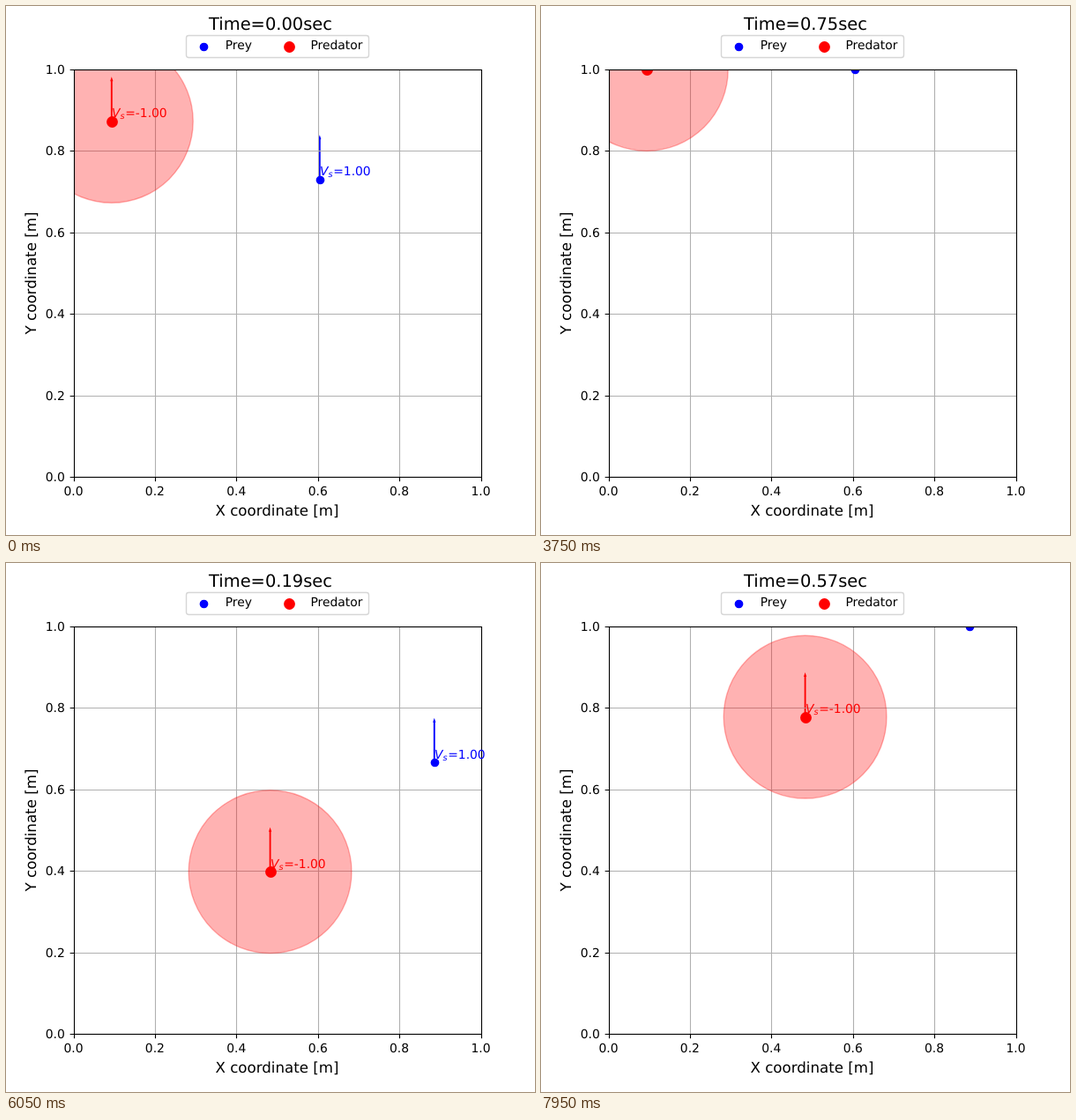
These frames come from a looping animation (600 px wide and 600 px high, 8 s). An HTML page:

```html
<!DOCTYPE html>
<html lang="en">
<head>
<meta charset="utf-8">
<title>Prey and predator</title>
<style>
  html, body { margin: 0; width: 100%; height: 100%; overflow: hidden; background: #fff; }
  svg { display: block; width: 100vw; height: 100vh; }
  text { font-family: "DejaVu Sans", sans-serif; font-size: 13.89px; text-rendering: geometricPrecision; }
  .mid { text-anchor: middle; }
  .end { text-anchor: end; }
  .label { font-size: 16.67px; }
  .title { font-size: 19.44px; }
  .line { fill: none; stroke-width: 1.11; }
</style>
</head>
<body>
<svg id="stage" viewBox="0 0 600 600"></svg>
<script>
const stage = document.getElementById("stage");
const LEFT = 76.5, TOP = 72, BOTTOM = 534, UNIT = 462;
const FRAME = 50, LOOP = 8000, RESTART = 102;

// Start positions in pixels for each episode.
const EPISODES = [
  { prey: [355.8, 196.65], predator: [119.8, 130.85] },
  { prey: [485.8, 314], predator: [299.6, 437.95] }
];

function add(parent, tag, attrs, text) {
  const node = document.createElementNS("http://www.w3.org/2000/svg", tag);
  for (const key in attrs) node.setAttribute(key, attrs[key]);
  if (text !== undefined) node.textContent = text;
  parent.appendChild(node);
  return node;
}

function set(node, attrs) {
  for (const key in attrs) node.setAttribute(key, attrs[key]);
}

const snap = v => Math.floor(v + 0.5) + 0.5;

const clip = add(add(stage, "defs", {}), "clipPath", { id: "plot" });
add(clip, "rect", { x: 77, y: TOP, width: UNIT, height: UNIT });

const layer = () => add(stage, "g", { "clip-path": "url(#plot)" });
const arrows = layer(), grid = layer(), marks = layer();
const frame = add(stage, "g", {}), labels = add(stage, "g", {});

const range = add(marks, "circle", {
  r: 0.2 * UNIT, fill: "#f00", "fill-opacity": 0.3,
  stroke: "#f00", "stroke-opacity": 0.3, "stroke-width": 1.39
});

function makeAgent(color, r, speed) {
  const text = add(labels, "text", { fill: color });
  add(text, "tspan", { "font-style": "italic" }, "V");
  add(text, "tspan", { "font-style": "italic", "font-size": 9.72, dy: 2 }, "s");
  add(text, "tspan", { dx: 0.6, dy: -2 }, "=" + speed);
  return {
    text,
    arrow: add(arrows, "path", { fill: color, stroke: color, "stroke-width": 1.39, "stroke-miterlimit": 10 }),
    dot: add(marks, "circle", { r, fill: color })
  };
}

const prey = makeAgent("#00f", 4.85, "1.00");
const predator = makeAgent("#f00", 6.42, "-1.00");

function drawAxes() {
  for (let i = 0; i <= 5; i++) {
    const x = LEFT + i * UNIT / 5, y = BOTTOM - i * UNIT / 5;
    const sx = snap(x), sy = snap(y), value = (i / 5).toFixed(1);
    if (i % 5) {
      add(grid, "path", {
        class: "line", stroke: "#b0b0b0",
        d: `M${sx} ${TOP}V${BOTTOM}M77 ${sy}H539`
      });
    }
    add(frame, "path", {
      class: "line", stroke: "#000",
      d: `M${sx} 534.5v4.86M77.5 ${sy}h-4.86`
    });
    add(frame, "text", { class: "mid", x, y: 555 }, value);
    add(frame, "text", { class: "end", x: 66.8, y: Math.round(y) + 5 }, value);
  }
  add(frame, "rect", { class: "line", stroke: "#000", x: 77.5, y: 72.5, width: UNIT, height: UNIT });
  add(frame, "text", { class: "mid label", x: 307.5, y: 578 }, "X coordinate [m]");
  add(frame, "text", { class: "mid label", transform: "translate(34 303) rotate(-90)" }, "Y coordinate [m]");
}

function drawLegend() {
  add(frame, "rect", {
    x: 204.5, y: 33.5, width: 207, height: 25, rx: 2.8,
    fill: "#fff", stroke: "#ccc", "stroke-opacity": 0.8, "stroke-width": 1.39
  });
  add(frame, "circle", { cx: 224.5, cy: 46.5, r: 4.85, fill: "#00f" });
  add(frame, "circle", { cx: 321.5, cy: 46.5, r: 6.42, fill: "#f00" });
  add(frame, "text", { x: 248.7, y: 49 }, "Prey");
  add(frame, "text", { x: 345.5, y: 49 }, "Predator");
}

drawAxes();
drawLegend();
const title = add(frame, "text", { class: "mid title", x: 300, y: 27 });

function place(agent, [x, startY], time) {
  const y = Math.max(TOP, startY - time * UNIT);
  const textY = y - 0.01 * UNIT;
  set(agent.dot, { cx: snap(x), cy: snap(y) });
  set(agent.arrow, {
    d: `M${x - 0.23} ${y}v-46.2h-.46l.69 -2.08l.69 2.08h-.46v46.2z`
  });
  set(agent.text, {
    x: Math.round(x), y: Math.round(textY),
    visibility: textY >= TOP ? "visible" : "hidden"
  });
  return y;
}

function render(ms) {
  const step = Math.floor((ms % LOOP) / FRAME);
  const episode = EPISODES[step < RESTART ? 0 : 1];
  const time = (step % RESTART) / 100;
  title.textContent = `Time=${time.toFixed(2)}sec`;
  place(prey, episode.prey, time);
  const y = place(predator, episode.predator, time);
  set(range, { cx: episode.predator[0], cy: y });
}

const start = performance.now();
function tick() {
  render(performance.now() - start);
  requestAnimationFrame(tick);
}
tick();
</script>
</body>
</html>
```
